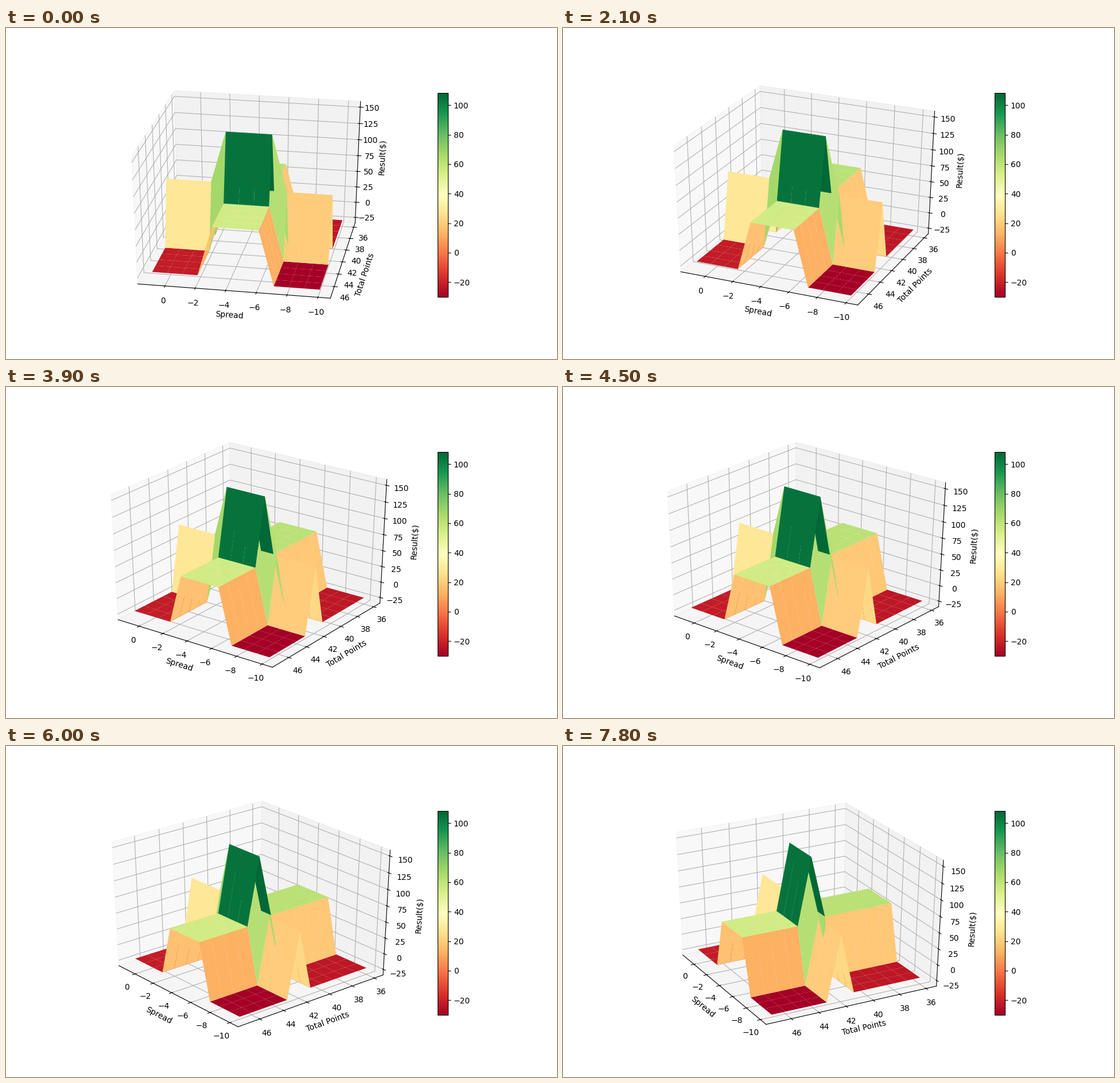
Animation of 960x576 px, one loop 8 s. Source, as a matplotlib script:

```python
import math

import matplotlib.pyplot as plt
import numpy as np
from matplotlib.animation import FuncAnimation

HOLD = 3          # ticks of 100 ms that each view stays
STEP = 2          # degrees turned per view
START_AZIM = 100
LABEL_PAD = 2.2
TICK_PAD = 2.7


def payout(stake, odds):
    """Profit of a winning bet at American odds."""
    return stake * (odds / 100 if odds > 0 else 100 / -odds)


def bet(wins, stake, odds):
    return np.where(wins, payout(stake, odds), -stake)


def padded(low, high, margin=0.0):
    """Limits widened by a data margin and by the gap to the panes."""
    for m in (margin, 1 / 48):
        gap = (high - low) * m
        low, high = low - gap, high + gap
    return low, high


spread, total = np.meshgrid(np.arange(-10, 2), np.arange(36, 48))
result = (bet(spread <= -2.5, 40, -110) + bet(spread >= -6.5, 60, -240)
          + bet(total >= 41.5, 50, -115) + bet(total <= 42.5, 50, 100))

fig = plt.figure(figsize=(9.6, 5.76), dpi=100)
ax = fig.add_subplot(projection="3d")
surface = ax.plot_surface(spread, total, result, rstride=1, cstride=1,
                          cmap="RdYlGn", linewidth=0)
bar = fig.colorbar(surface, ax=ax, shrink=0.8, aspect=20)
bar.set_ticks(np.arange(-20, 101, 20))

# A unit cube stretched over the whole axes rectangle.
ax.apply_aspect = lambda position=None: None
ax.set_box_aspect((1, 1, 1), zoom=math.sqrt(3) / 1.8294640721620434)

ax.set_xlim(padded(-10, 1, 0.05))
ax.set_ylim(padded(36, 47, 0.05))
ax.set_zlim(padded(result.min(), result.max()))
ax.set_xticks(np.arange(-10, 1, 2))
ax.set_yticks(np.arange(36, 47, 2))
ax.set_zticks(np.arange(-25, 151, 25))
ax.tick_params(pad=TICK_PAD)
ax.set_xlabel("Spread", labelpad=LABEL_PAD)
ax.set_ylabel("Total Points", labelpad=LABEL_PAD)
ax.set_zlabel("Result($)", labelpad=LABEL_PAD)


def update(tick):
    ax.view_init(elev=30, azim=START_AZIM + STEP * (tick // HOLD))
    return [surface]


anim = FuncAnimation(fig, update, frames=80, interval=100,
                     repeat=True, repeat_delay=0)
plt.show()
```
